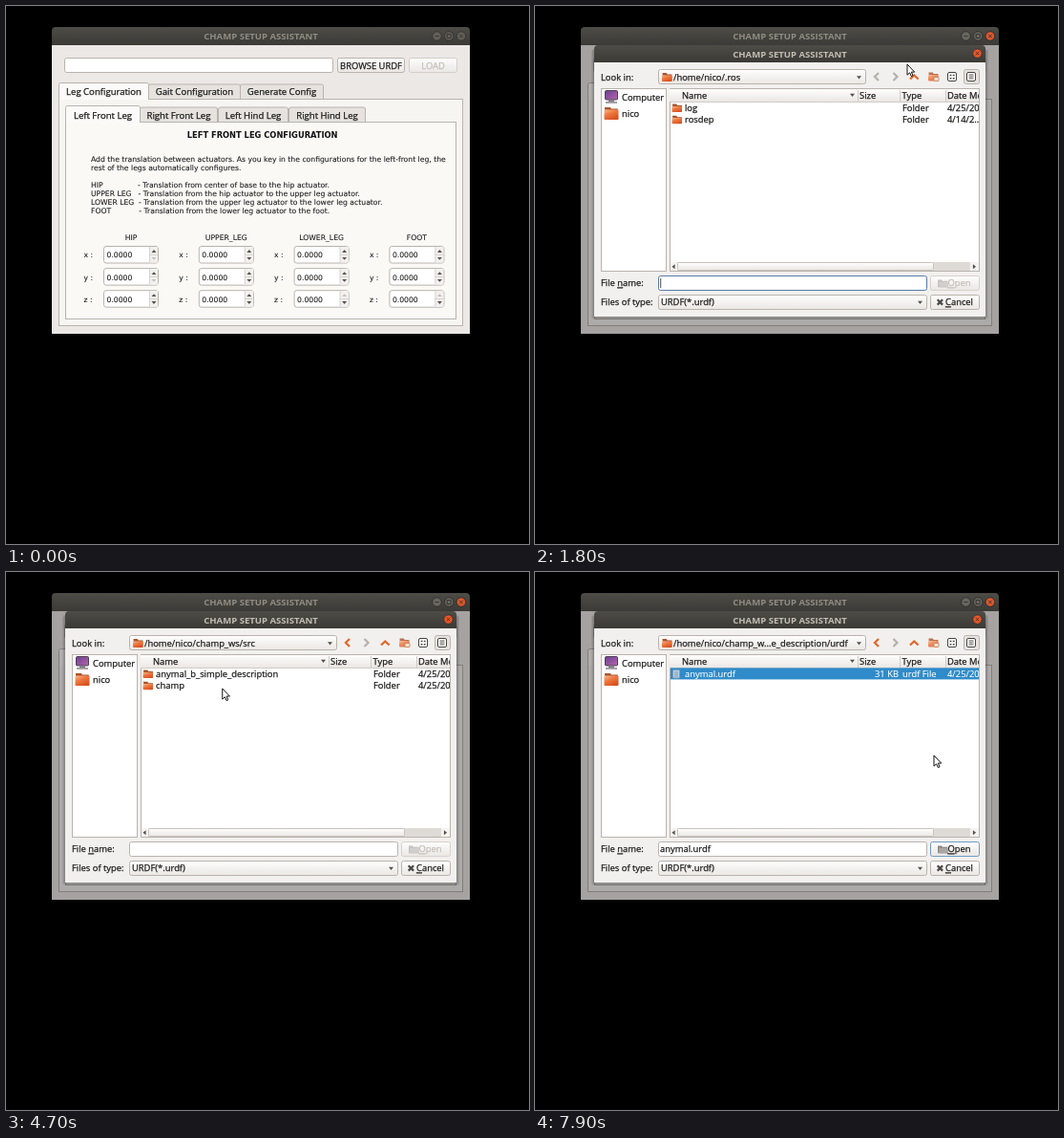
Animation, 548 px wide and 563 px high, one loop 8000 ms. Source, as an HTML page:

```html
<!DOCTYPE html>
<html lang="en">
<head>
<meta charset="utf-8">
<title>Setup assistant</title>
<style>
  html, body { margin: 0; width: 100%; height: 100%; overflow: hidden; background: #000; }
  svg { display: block; }
  text { font: 9.4px "Open Sans", "Noto Sans", sans-serif; color: #1b1a19; fill: currentColor; stroke: currentColor; stroke-width: .25px; white-space: pre; }
  .tab { font-size: 9.55px; }
  .title { font-weight: 700; font-size: 9.55px; text-anchor: middle; stroke: none; }
  .body { font: 7.68px "DejaVu Sans", sans-serif; stroke-width: .08px; }
  .head { font: 700 8.3px "DejaVu Sans", sans-serif; text-anchor: middle; color: #111; stroke: none; }
  .mid { text-anchor: middle; }
  .end { text-anchor: end; }
  .off { color: #c3beb9; }
  .on { color: #fff; stroke-width: .12px; }
  .u { text-decoration: underline; }
</style>
</head>
<body>
<svg id="stage" width="548" height="563" viewBox="0 0 548 563">
  <defs>
    <linearGradient id="bar" x2="0" y2="1"><stop stop-color="#4d4c46"/><stop offset="1" stop-color="#3b3a36"/></linearGradient>
    <linearGradient id="btn" x2="0" y2="1"><stop stop-color="#fefefd"/><stop offset="1" stop-color="#eae7e4"/></linearGradient>
    <linearGradient id="fold" x2=".6" y2="1"><stop stop-color="#f9bd94"/><stop offset=".45" stop-color="#ee7a42"/><stop offset="1" stop-color="#d9501f"/></linearGradient>
    <linearGradient id="screen" x2="1" y2="1"><stop stop-color="#6d3f93"/><stop offset="1" stop-color="#b565ab"/></linearGradient>
  </defs>
  <g id="main"></g>
  <g id="dialog"></g>
  <path id="pointer" d="M0 0V11.2L2.6 8.8L4.3 12.6L6 11.9L4.4 8.1H7.7Z" fill="#fff" stroke="#111" stroke-width="1" stroke-linejoin="round"/>
</svg>
<script>
const LOOP = 8000, STEP = 100;
const USER = 'nico', HOME = '/home/' + USER;
const BLUE = '#2f8bc9', EDGE = '#b9b3ad';
const $ = id => document.getElementById(id);

// Drawing helpers
const text = (x, y, s, cls = '') => `<text x="${x}" y="${y}" class="${cls}">${s}</text>`;
const box = (x, y, x2, y2, fill, stroke = 'none', r = 0) => {
  const i = stroke === 'none' ? 0 : .5;
  return `<rect x="${x + i}" y="${y + i}" width="${x2 - x - 2 * i}" height="${y2 - y - 2 * i}" rx="${r}" fill="${fill}" stroke="${stroke}"/>`;
};
const path = (d, stroke, w = 1, fill = 'none') =>
  `<path d="${d}" fill="${fill}" stroke="${stroke}" stroke-width="${w}"/>`;
const fade = (opacity, s) => `<g opacity="${opacity}">${s}</g>`;
const tri = (x, y, dx, dy, fill = '#55524e') => path(dx
  ? `M${x - dx} ${y - 2.5}V${y + 2.5}L${x + dx} ${y}Z`
  : `M${x - 2.5} ${y - dy}H${x + 2.5}L${x} ${y + dy}Z`, 'none', 0, fill);
const button = (x, y, x2, y2, edge = EDGE) => box(x, y, x2, y2, 'url(#btn)', edge, 2);
const titleBar = (x, y, x2, y2, color) =>
  `<path d="M${x} ${y2}V${y + 4}Q${x} ${y} ${x + 4} ${y}H${x2 - 4}Q${x2} ${y} ${x2} ${y + 4}V${y2}Z" fill="url(#bar)"/>` +
  `<text x="267" y="${y + 12.8}" class="title" style="color:${color}">CHAMP SETUP ASSISTANT</text>`;
const knob = (x, y, fill, glyph, ink) =>
  `<circle cx="${x}" cy="${y}" r="4.7" fill="${fill}" stroke="#31302c" stroke-width=".8"/>` +
  path(`M${x} ${y}` + glyph, ink, .9);
const GLYPH = { min: 'm-2 0h4', max: 'm-2 -2h4v4h-4z', close: 'm-1.8 -1.8l3.6 3.6m0 -3.6l-3.6 3.6' };
const knobs = modal => ['min', 'max', 'close'].map((k, i) => knob(451.5 + 12.7 * i, 31.5,
  !modal ? '#625f59' : i < 2 ? '#68665f' : '#e0582d', GLYPH[k], '#33322e')).join('');
const folder = (x, y, w, h) =>
  path(`M${x + .5} ${y}h${w * .4}l1 1.5h${w * .45}v${h - 2}h${-w * .9}z`, 'none', 0, '#a9552e') +
  box(x, y + 2.4, x + w, y + h, 'url(#fold)', 'none', 1);

function tabs(list, y, base, line) {
  return list.map(([x, x2, label], i) => {
    const top = i ? y + 1.5 : y, low = i ? line : line + 1;
    return path(`M${x + .5} ${low}V${top + 2.5}q0 -2 2 -2H${x2 - 2.5}q2 0 2 2V${low}`, EDGE, 1, i ? '#e6e3df' : '#fbfaf8') +
      text((x + x2) / 2, base, label, 'tab mid');
  }).join('');
}

function spin(x, y, weak) {
  return box(x, y, x + 58, y + 18.5, '#fff', EDGE, 2.5) +
    box(x + 48, y + 1, x + 57, y + 17.5, '#f3f1ef') +
    path(`M${x + 48.5} ${y + 1}v16.5M${x + 48} ${y + 9.3}h9`, '#d2cdc8', .8) +
    tri(x + 53, y + 5.5, 0, -1.4, weak === 'up' ? '#c4c0bb' : '#55524e') +
    tri(x + 53, y + 13.3, 0, 1.4, weak === 'down' ? '#c4c0bb' : '#55524e') +
    text(x + 3.5, y + 12.4, '0.0000', 'body');
}

function mainWindow() {
  const legend = [['HIP', 138, 'center of base to the hip actuator.'],
    ['UPPER LEG', 138.6, 'the hip actuator to the upper leg actuator.'],
    ['LOWER LEG', 139, 'the upper leg actuator to the lower leg actuator.'],
    ['FOOT', 139.3, 'the lower leg actuator to the foot.']];
  let s = box(48, 40, 486, 343, '#ece8e6') + titleBar(48, 22, 486, 41, '#8f8c84') +
    box(61, 54, 343, 70, '#fff', EDGE, 2) +
    button(347, 54, 418, 70) + text(382.5, 65.6, 'BROWSE URDF', 'mid') +
    button(422, 54, 473, 70, '#d3cec9') + text(447.5, 65.6, 'LOAD', 'mid off') +
    box(55, 97, 479, 335, '#f7f5f2', EDGE) +
    tabs([[55, 150, 'Leg Configuration'], [149, 246, 'Gait Configuration'], [245, 333, 'Generate Config']], 80, 93.2, 97) +
    box(62, 121, 472, 328, '#faf9f6', EDGE) +
    tabs([[62, 141, 'Left Front Leg'], [140, 222, 'Right Front Leg'], [222, 296, 'Left Hind Leg'], [296, 377, 'Right Hind Leg']], 104, 117.5, 121) +
    text(268.7, 138, 'LEFT FRONT LEG CONFIGURATION', 'head') +
    text(89, 163, 'Add the translation between actuators. As you key in the configurations for the left-front leg, the', 'body') +
    text(89, 172, 'rest of the legs automatically configures.', 'body');
  legend.forEach(([name, x, tail], i) => {
    s += text(89, 190 + 9 * i, name, 'body') + text(x, 190 + 9 * i, '- Translation from ' + tail, 'body');
  });
  ['HIP', 'UPPER_LEG', 'LOWER_LEG', 'FOOT'].forEach((name, c) => {
    const x = 102 + 99.8 * c;
    s += text(x + 29, 245, name, 'body mid');
    ['x', 'y', 'z'].forEach((axis, r) => {
      const y = 251 + 23.1 * r;
      const weak = c === 0 && r < 2 ? 'down' : c > 1 && r === 2 ? 'up' : '';
      s += text(x - 20.5, y + 12.4, axis + ' :', 'body') + spin(x, y, weak);
    });
  });
  return s + knobs(false);
}

// Folder views: rows are "name:day"
const VIEWS = {
  ros: { path: HOME + '/.ros', rows: 'log:25 rosdep:14', first: true, focus: true },
  home: { path: HOME, focus: true, tall: true, rows: '.ros:25 build:21 catkin_ws:15 champ_ws:20 Desktop:19 Documents:14 Downloads:24 ' +
    'firmware:20 gazebo_models:16 healthcare_ws:24 install:21 linux_install:14 log:22 Music:14' },
  ws: { path: HOME + '/champ_ws', rows: 'build:24 devel:20 src:25' },
  src: { path: HOME + '/champ_ws/src', rows: 'anymal_b_simple_description:25 champ:25' },
  desc: { path: HOME + '/champ_w...simple_description', rows: 'config:25 doc:25 launch:25 meshes:25 urdf:25' },
  urdf: { path: HOME + '/champ_w...e_description/urdf', rows: 'anymal.urdf:25', file: true }
};

function row(entry, i, picked, file) {
  const [name, day] = entry.split(':'), y = 110 + 12.2 * i, cls = picked ? 'on' : '';
  const date = day === '25' ? '4/25/2020' : `4/${day}/2...`;
  const icon = file
    ? box(144, y - 8, 152, y + 1.5, '#b9cfe0', '#7f9db4', 1) + path(`M146 ${y - 5}h4m-4 2h4m-4 2h4`, '#6f8ba1', .7)
    : folder(143.5, y - 7.5, 10.5, 8.5);
  return (picked ? box(142, y - 9.6, 466, y + 2.4, BLUE) : '') + icon + text(157, y, name, cls) +
    (file ? text(381, y, '31 KB', cls + ' end') : '') +
    text(385, y, file ? 'urdf File' : 'Folder', cls) + text(432, y, date, cls);
}

function list(v, sel) {
  const right = v.tall ? 456 : 465, w = right - 141, thumb = v.tall ? 404 : 418;
  const head = box(141, 87, 466, 100, 'url(#btn)') + path('M141 100.5H466M338.5 88v12M382.5 88v12M430.5 88v12', '#cbc6c1', .9) +
    text(154, 97, 'Name') + text(340, 97, 'Size') + text(384.5, 97, 'Type') + text(432, 97, 'Date Modified') + tri(332.5, 93.3, 0, 1.6);
  const rows = v.rows.split(' ').map((r, i) => row(r, i, i === sel, v.file)).join('');
  let s = box(141, 86, 466, 278, '#fff', EDGE) +
    `<svg x="141" y="87" width="${w}" height="181" viewBox="141 87 ${w} 181">${head}${rows}</svg>` +
    box(142, 268, 465, 277, '#dedad6') + box(142, 268, 149, 277, '#f6f4f2') +
    box(149, 268, thumb, 277, 'url(#btn)', '#c8c3be', 1) +
    box(right - 9, 268, right, 277, '#f6f4f2') + tri(145, 272.7, -1.6, 0) + tri(right - 4.5, 272.7, 1.6, 0);
  if (v.tall) s += box(456, 87, 465, 268, '#dedad6') + box(456, 87, 465, 97, '#f6f4f2') +
    box(456, 97, 465, 196, 'url(#btn)', '#c8c3be', 1) + box(456, 260, 465, 277, '#f6f4f2') +
    tri(460.5, 92, 0, -1.6) + tri(460.5, 264.5, 0, 1.6);
  return s;
}

function toolbar(v, hover) {
  const orange = '#e2672c', grey = '#b5b2ae';
  return (hover ? button(390, 66, 406, 82) : '') +
    path('M360 70l-4 4l4 4', v.first ? grey : orange, 2.3) + path('M375.5 70l4 4l-4 4', grey, 2.3) +
    path('M393 76.5l4.3 -4l4.3 4', orange, 2.3) +
    fade(.8, folder(412, 69.5, 10.5, 9)) + box(417.5, 74, 423.5, 79, '#f6e3d2', '#c98a63', .5) +
    box(432, 69, 442, 79, '#fff', '#45433f', 1.5) +
    path('M434.6 72.5h1.8m1.4 0h1.8M434.6 75.7h1.8m1.4 0h1.8', '#45433f', 1.5) +
    box(449, 66, 466, 82, '#e5e2df', EDGE, 2) + box(452, 69, 462, 79, '#fff', '#45433f', 1.5) +
    path('M454.5 72h5m-5 2h5m-5 2h5', '#45433f', .9);
}

function sidebar(home) {
  return box(69, 86, 138, 278, '#fff', EDGE) +
    box(73, 88, 87, 98.5, 'url(#screen)', '#4a4350', 1) + box(77, 98.5, 83, 100, '#77727a') + box(74, 100, 86, 102, '#a5a0a6') +
    text(91, 99, 'Computer') + (home ? box(70, 103.5, 137, 119.7, BLUE) : '') +
    fade(home ? .65 : 1, folder(72.5, 106, 15, 13)) + text(91, 115.7, USER, home ? 'on' : '');
}

function dialog(name, sel, hover) {
  const v = VIEWS[name], chosen = v.file && sel === 0, ready = sel >= 0;
  const shadow = [1, 2, 3].map(d => box(62 - d, 45, 472 + d, 325 + d, 'rgba(0,0,0,.08)', 'none', 3)).join('');
  return box(48, 41, 486, 343, 'rgba(0,0,0,.3)') + knobs(true) + shadow +
    box(62, 58, 472, 325, '#f2f0ee') + titleBar(62, 41, 472, 59, '#c2beb5') +
    knob(463.5, 49.6, '#e4582b', GLYPH.close, '#5b2a19') +
    text(69, 77.5, 'Look in:') + button(129, 66, 347, 82) + folder(133, 70, 10.5, 9) +
    text(145, 77.5, v.path) + tri(339.5, 74.8, 0, 1.6) + toolbar(v, hover) +
    sidebar(name === 'home') + list(v, sel) +
    text(69, 293.4, 'File <tspan class="u">n</tspan>ame:') +
    box(129, 282, 411, 298, '#fff', v.focus ? '#577ba8' : EDGE, 2) +
    (v.focus ? path('M131.7 285v10', '#222', .8) : '') +
    (chosen ? text(131, 293.4, 'anymal.urdf') : '') +
    button(414, 282, 466, 298, chosen ? '#6f9cc6' : ready ? EDGE : '#d6d1cc') +
    fade(ready ? 1 : .45, path('M422 286.5h4l1 1.3h5.5v6.5h-10.5z', 'none', 0, '#8e8c89') + box(423.5, 289, 433, 294.5, '#aaa8a5')) +
    text(432.5, 293.4, '<tspan class="u">O</tspan>pen', ready ? '' : 'off') +
    text(69, 313.4, 'Files of type:') + button(129, 302, 411, 318) + text(132, 313.4, 'URDF(*.urdf)') + tri(403.5, 310.3, 0, 1.6) +
    button(414, 302, 466, 318) + path('M421.7 307.2l5.4 5.4m0 -5.4l-5.4 5.4', '#4a4845', 2.2) +
    text(430, 313.4, '<tspan class="u">C</tspan>ancel');
}

// Timeline: [time, view, selected row]
const SCENES = [[0], [1300, 'ros', -1], [2500, 'home', -1], [3400, 'home', 3], [3700, 'ws', -1], [4200, 'ws', 2],
  [4400, 'src', -1], [5200, 'src', 0], [5400, 'desc', -1], [6200, 'desc', 4], [6400, 'urdf', -1], [7000, 'urdf', 0]];
// Pointer stops: [time, x, y]
const STOPS = [[300, 436, 210], [800, 391, 61], [1800, 390, 61], [2300, 402, 70], [2900, 402, 70], [3300, 225, 145],
  [3800, 225, 145], [4100, 225, 129], [4500, 225, 129], [5000, 230, 109], [5600, 230, 109], [6100, 229, 152],
  [6500, 229, 152], [6900, 232, 105], [7200, 232, 105], [7800, 418, 192], [8000, 418, 192]];

function pointerAt(t) {
  const i = Math.max(1, STOPS.findIndex(s => s[0] > t));
  const [a, x, y] = STOPS[i - 1], [b, x2, y2] = STOPS[i];
  const p = Math.min(1, Math.max(0, (t - a) / (b - a))), e = p * p * (3 - 2 * p);
  return [x + (x2 - x) * e, y + (y2 - y) * e];
}

let shown = '';
function draw(now) {
  const t = Math.floor(now % LOOP / STEP) * STEP;
  const [x, y] = pointerAt(t);
  $('pointer').setAttribute('transform', `translate(${x} ${y})`);
  $('pointer').style.display = t < STOPS[0][0] ? 'none' : '';
  const [, view, sel] = SCENES.filter(s => s[0] <= t).pop();
  const hover = x > 393 && x < 406 && y > 66 && y < 82;
  const key = [view, sel, hover].join();
  if (key !== shown) {
    shown = key;
    $('dialog').innerHTML = view ? dialog(view, sel, hover) : '';
  }
}

$('main').innerHTML = mainWindow();
const start = performance.now();
(function tick() {
  draw(performance.now() - start);
  requestAnimationFrame(tick);
})();
</script>
</body>
</html>
```
